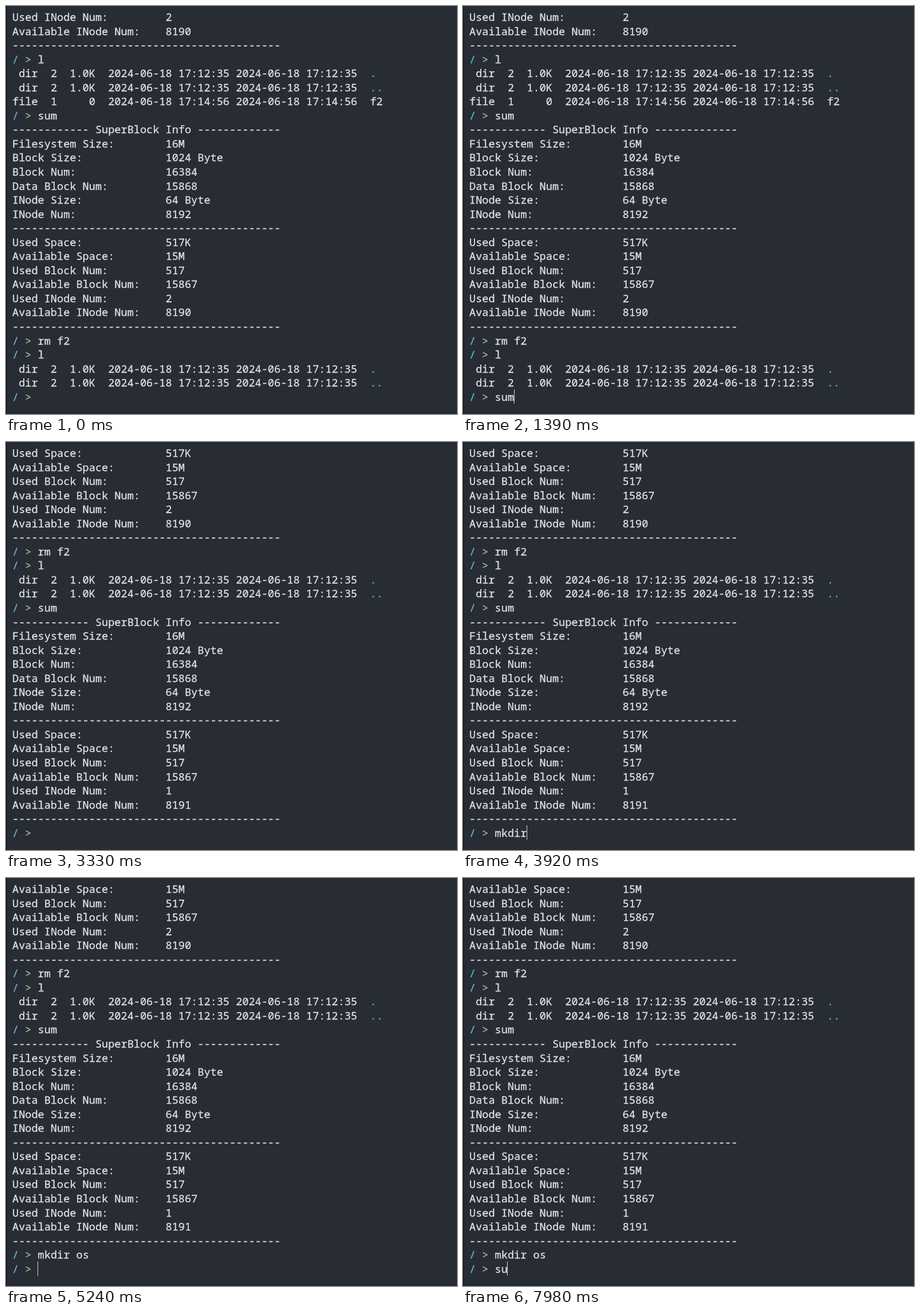
These frames come from a looping animation (787x712 px, 8000 ms). An HTML page:

```html
<!DOCTYPE html>
<html lang="en">
<head>
<meta charset="utf-8">
<title>Terminal</title>
<style>
  html, body { margin: 0; width: 100%; height: 100%; overflow: hidden; background: #282c34; }
  body { position: relative; box-shadow: inset 1.5px 0 #101216; }
  pre {
    position: absolute; left: 10.5px; top: 6.5px; margin: 0;
    font: 18.58px/24.55px "Noto Sans Mono", monospace;
    font-variant-ligatures: none; color: #e0e3e8;
    -webkit-text-stroke: .3px;
    transform: rotate(.001deg); /* stops baselines snapping to whole pixels */
    transform-origin: 0 0;
  }
  .cyan { color: #5cbccb; }
  .green { color: #a3be8c; }
  #caret { position: absolute; top: 669px; width: 1px; height: 25px; background: #cfd2d8; }
</style>
</head>
<body>
<pre id="screen"></pre>
<div id="caret"></div>
<script>
const LOOP = 8000, ROWS = 28, CELL = 11.148, LEFT = 10.6;
const screenEl = document.getElementById('screen');
const caretEl = document.getElementById('caret');

const span = (cls, text) => `<span class="${cls}">${text}</span>`;
const prompt = text => `${span('cyan', '/')} ${span('green', '&gt;')} ${text}`;
const rule = '-'.repeat(42);
const row = (label, value) => (label + ':').padEnd(24) + value;
const entry = (info, time, name) => `${info}  2024-06-18 ${time} 2024-06-18 ${time}  ${name}`;
const dirs = ['.', '..'].map(d => entry(' dir  2  1.0K', '17:12:35', span('cyan', d)));

const summary = inodes => [
  '-'.repeat(12) + ' SuperBlock Info ' + '-'.repeat(13),
  row('Filesystem Size', '16M'),
  row('Block Size', '1024 Byte'),
  row('Block Num', 16384),
  row('Data Block Num', 15868),
  row('INode Size', '64 Byte'),
  row('INode Num', 8192),
  rule,
  row('Used Space', '517K'),
  row('Available Space', '15M'),
  row('Used Block Num', 517),
  row('Available Block Num', 15867),
  row('Used INode Num', inodes),
  row('Available INode Num', 8192 - inodes),
  rule
];

const before = [
  ...summary(2).slice(-3),
  prompt('l'), ...dirs, entry('file  1     0', '17:14:56', 'f2'),
  prompt('sum'), ...summary(2),
  prompt('rm f2'), prompt('l'), ...dirs
];
const afterSum = [...before, prompt('sum'), ...summary(1)];
const afterMkdir = [...afterSum, prompt('mkdir os')];

// [start ms, history above the prompt, typed text, caret visible]
const steps = [
  [0, before, '', 0], [200, before, '', 1], [800, before, '', 0],
  [1140, before, 's', 1], [1270, before, 'su', 1], [1390, before, 'sum', 1],
  [1590, afterSum, '', 1], [2180, afterSum, '', 0], [2780, afterSum, '', 1], [3330, afterSum, '', 0],
  [3460, afterSum, 'm', 1], [3530, afterSum, 'mk', 1],
  [3730, afterSum, 'mkd', 1], [3830, afterSum, 'mkdi', 1], [3920, afterSum, 'mkdir', 1],
  [4180, afterSum, 'mkdir ', 1], [4840, afterSum, 'mkdir ', 0],
  [4980, afterSum, 'mkdir o', 1], [5040, afterSum, 'mkdir os', 1],
  [5240, afterMkdir, '', 1], [5850, afterMkdir, '', 0],
  [6020, afterMkdir, 'u', 1], [6050, afterMkdir, 'us', 1], [6710, afterMkdir, 'us', 0],
  [6840, afterMkdir, 'u', 1], [6970, afterMkdir, '', 1],
  [7240, afterMkdir, 'u', 1], [7510, afterMkdir, 'us', 1],
  [7710, afterMkdir, 'u', 1], [7800, afterMkdir, '', 1],
  [7890, afterMkdir, 's', 1], [7980, afterMkdir, 'su', 1]
];

let shown;
function draw() {
  const t = performance.now() % LOOP;
  const step = steps.findLast(s => s[0] <= t);
  if (step !== shown) {
    const [, history, typed, caret] = shown = step;
    screenEl.innerHTML = [...history.slice(1 - ROWS), prompt(typed)].join('\n');
    caretEl.style.left = Math.round(LEFT + (4 + typed.length) * CELL) + 'px';
    caretEl.style.visibility = caret ? 'visible' : 'hidden';
  }
  requestAnimationFrame(draw);
}
draw();
</script>
</body>
</html>
```
